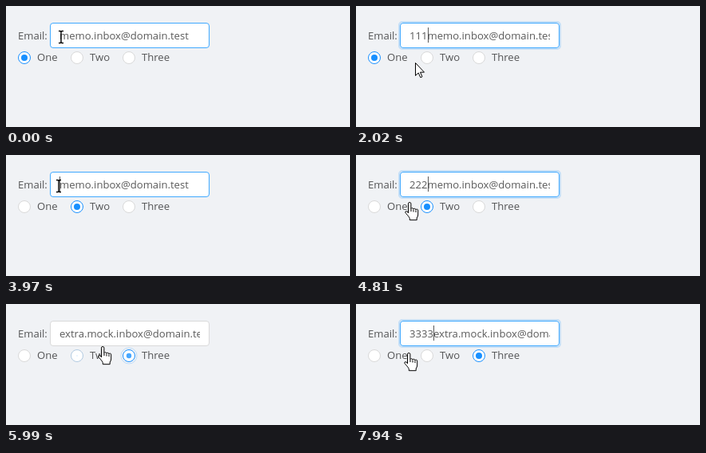
Write an HTML page that moves like this. It is 431 px wide and 152 px high and loops after 8000 ms.

```html
<!DOCTYPE html>
<html lang="en">
<head>
<meta charset="utf-8">
<title>Email form</title>
<style>
html, body { margin: 0; width: 100%; height: 100%; overflow: hidden; background: #f0f2f5; }
svg { display: block; }
text { font: 13.1px "Open Sans", "Noto Sans", sans-serif; fill: rgba(0, 0, 0, .65); white-space: pre; }
.cursor path { fill: #fff; stroke: #000; stroke-linejoin: round; }
</style>
</head>
<body>
<svg width="431" height="152" viewBox="0 0 431 152">
  <clipPath id="inner"><rect x="67" y="22" width="176" height="30"/></clipPath>
  <text x="15" y="42">Email:</text>
  <rect id="glow" x="54" y="20" width="202" height="34" rx="4" fill="none" stroke="#1890ff" stroke-width="2"/>
  <rect id="field" x="55.5" y="21.5" width="199" height="31" rx="3.5" fill="#fff"/>
  <g clip-path="url(#inner)"><text id="value" x="67" y="42"></text></g>
  <rect id="caret" y="27" width="1" height="19" fill="#595959"/>
  <g id="radios"></g>
  <g id="ibeam" class="cursor">
    <path d="M-3 -7.5H-1L0 -6.5 1 -7.5H3M0 -6.5V6.5M-3 7.5H-1L0 6.5 1 7.5H3" style="fill:none;stroke-width:1.4"/>
  </g>
  <g id="arrow" class="cursor">
    <path d="M.5 .5V16.5L4.2 13 6.8 18.8 9 17.8 6.5 12.2H11.5Z"/>
  </g>
  <g id="hand" class="cursor">
    <path d="M-1.5 14V2.2a1.7 1.7 0 0 1 3.4 0V8.5a1.6 1.6 0 0 1 3 .6a1.6 1.6 0 0 1 3 .8a1.5 1.5 0 0 1 2.8 1V16q0 2-1.5 4V22.7H.3V20.5q-1-2-3-4.2T-5.2 13.2q0-2 1.8-1.4T-1.5 14Z"/>
    <path d="M2 8.5V12M5 9.5V12.5M8 10.3V13" style="fill:none"/>
  </g>
</svg>
<script>
const LOOP = 8000, FADE = 300, BLINK = 530;
const FIRST = 'memo.inbox@domain.test', SECOND = 'extra.mock.inbox@domain.test';
const $ = id => document.getElementById(id);
const clamp = x => Math.min(1, Math.max(0, x));
const smooth = x => (x = clamp(x), x * x * x * (x * (6 * x - 15) + 10));
const set = (el, attrs) => { for (const k in attrs) el.setAttribute(k, attrs[k]); };

// pointer hot spot: [time, x, y]
const path = [
  [0, 69, 39], [690, 69, 39], [1080, 74, 71], [2490, 74, 71], [2720, 93, 67],
  [3440, 93, 67], [3810, 66, 39], [4200, 66, 39], [4430, 67, 59], [5050, 67, 59],
  [5120, 67, 60], [5250, 67, 60], [5520, 154, 63], [5840, 154, 63], [5990, 121, 53],
  [6070, 100, 45], [6200, 52, 41], [6330, 65, 46], [6800, 65, 46], [7240, 65, 53],
  [7600, 65, 53], [7780, 72, 58], [7940, 66, 61]
];
const shapes = [
  [0, 'ibeam'], [850, 'arrow'], [2600, 'hand'], [3650, 'ibeam'],
  [4390, 'hand'], [6050, 'ibeam'], [7020, 'hand']
];
const typing = [
  { start: 690, end: 3110, digit: '1', keys: [1480, 1770, 2020, 2240] },
  { start: 3970, end: 5550, digit: '2', keys: [4200, 4430, 4810, 5050] },
  { start: 6330, end: LOOP + 1, digit: '3', keys: [6860, 7020, 7240, 7480] }
];
const picks = [3250, 5790];
const hovers = [[-FADE, 850], [3650, 3980], [6030, 6340]];

const radios = [
  { x: 23, label: 'One', on: -LOOP, off: picks[0] },
  { x: 89, label: 'Two', on: picks[0], off: picks[1], hover: 2620 },
  { x: 154, label: 'Three', on: picks[1], off: 2 * LOOP, hover: 5450 }
];
const svgChild = (tag, attrs) => {
  const el = document.createElementNS('http://www.w3.org/2000/svg', tag);
  set(el, attrs);
  return $('radios').appendChild(el);
};
for (const r of radios) {
  const circle = attrs => svgChild('circle', { cx: r.x, cy: 65, r: 7.5, ...attrs });
  r.ring = circle({ fill: '#fff' });
  r.wave = circle({ fill: 'none', stroke: '#1890ff' });
  r.dot = circle({ fill: '#1890ff' });
  svgChild('text', { x: r.x + 16, y: 69 }).textContent = r.label;
}

// eased presence of a state lasting from start to end
const span = (t, start, end) => smooth((t - start) / FADE) * (1 - smooth((t - end) / FADE));

const mix = (to, k) =>
  `rgb(${to.map(c => Math.round(217 + (c - 217) * k))})`;

function pointerAt(t) {
  const i = path.findIndex(p => p[0] > t);
  if (i < 0) return path[path.length - 1].slice(1);
  const [t0, x0, y0] = path[i - 1], [t1, x1, y1] = path[i];
  const k = (t - t0) / (t1 - t0);
  return [x0 + (x1 - x0) * k, y0 + (y1 - y0) * k];
}

function drawField(t) {
  const focus = Math.max(...typing.map(s => span(t, s.start, s.end)));
  const hover = Math.max(...hovers.map(h => span(t, ...h)));
  set($('glow'), { 'stroke-opacity': 0.2 * focus });
  set($('field'), { stroke: mix([64, 169, 255], Math.max(focus, hover)) });

  // typed digits stay after blur until the next radio is picked
  const session = typing.filter(s => t >= s.start).pop();
  const pick = picks.filter(p => t >= p).pop() || 0;
  const kept = session && session.start >= pick;
  const keys = kept ? session.keys.filter(k => t >= k) : [];
  $('value').textContent = (kept ? session.digit.repeat(keys.length) : '') + (t < picks[1] ? FIRST : SECOND);

  const active = session && t < session.end;
  const since = active ? t - (keys.length ? keys[keys.length - 1] : session.start) : 0;
  const lit = active && Math.floor(since / BLINK) % 2 === 0;
  set($('caret'), { x: 67 + Math.round(7.5 * keys.length), opacity: lit ? 1 : 0 });
}

function drawRadio(r, t) {
  const on = span(t, r.on, r.off);
  const edge = span(t, r.hover || r.on, r.off);
  const w = clamp((t - r.on) / 360);
  set(r.ring, { stroke: mix([24, 144, 255], edge) });
  set(r.dot, { r: 4 * on, opacity: on });
  set(r.wave, { r: 7.5 * (1 + 0.6 * w), opacity: t < r.on ? 0 : 0.5 * (1 - w) });
}

function frame(now) {
  const t = now % LOOP;
  drawField(t);
  radios.forEach(r => drawRadio(r, t));
  const shape = shapes.filter(s => t >= s[0]).pop()[1];
  const [x, y] = pointerAt(t).map(Math.round);
  for (const id of ['ibeam', 'arrow', 'hand'])
    set($(id), { transform: `translate(${x} ${y})`, visibility: id === shape ? 'visible' : 'hidden' });
  requestAnimationFrame(frame);
}
frame(0);
</script>
</body>
</html>
```
